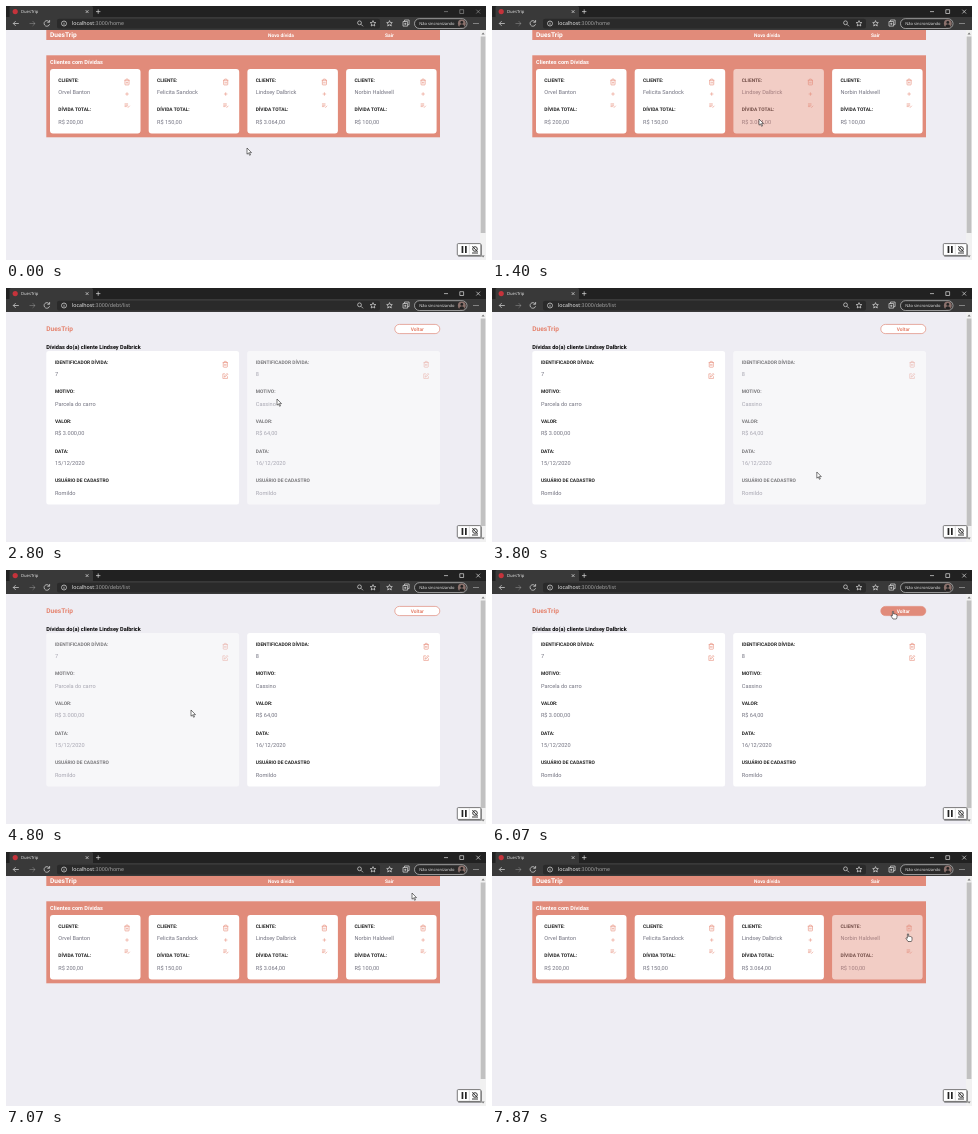
These frames come from a looping animation (480 by 254 pixels, 8000 ms). An HTML page:

```html
<!DOCTYPE html>
<html lang="pt-BR">
<head>
<meta charset="utf-8">
<title>DuesTrip</title>
<style>
  html, body { margin: 0; height: 100%; overflow: hidden; background: #eeedf3; }
  svg { display: block; width: 100vw; height: 100vh; text-rendering: geometricPrecision; }
  text { font: 5.6px Roboto, sans-serif; fill: #737380; }
  .label { font-size: 4.87px; font-weight: 700; fill: #222; }
  .brand { font-size: 6.6px; font-weight: 700; }
  .title { font-weight: 700; fill: #000; }
  .nav { font-size: 4.9px; font-weight: 700; }
  .white { fill: #fff; }
  .accent { fill: #e5836e; }
  .ui text { font-family: "Open Sans", sans-serif; font-size: 5.3px; fill: #aaa; }
  .ui .small { font-size: 4.2px; fill: #e8e8e8; }
  .ui .host { fill: #f4f4f4; }
  .line { fill: none; stroke: #ddd; stroke-width: .7; }
  .icon { fill: none; stroke: #e5836e; stroke-width: 2; stroke-linejoin: round; }
</style>
</head>
<body>
<script>
const LOOP = 8000, OPEN_LIST = 1530, BACK_HOME = 6600;
const SALMON = '#e18b7a';

const icons = {
  trash: 'M3 6h18M19 6v14a2 2 0 0 1-2 2H7a2 2 0 0 1-2-2V6m3 0V4a2 2 0 0 1 2-2h4a2 2 0 0 1 2 2v2M10 11v6M14 11v6',
  edit: 'M11 4H3v17h17v-8M18.5 2.5l3 3L12 15l-4 1 1-4z',
  plus: 'M12 5v14M5 12h14',
  list: 'M3 6h13M3 11h13M3 16h8M13 16l3 3 6-6',
};

const text = (x, y, str, cls = '', extra = '') => `<text x="${x}" y="${y}" class="${cls}" ${extra}>${str}</text>`;
const rect = (x, y, w, h, fill, r = 0, extra = '') =>
  `<rect x="${x}" y="${y}" width="${w}" height="${h}" fill="${fill}" rx="${r}" ${extra}/>`;
const line = (d, extra = '') => `<path class="line" d="${d}" ${extra}/>`;
const icon = (name, cx, cy, size = 7) =>
  `<path class="icon" d="${icons[name]}" transform="translate(${cx - size / 2} ${cy - size / 2}) scale(${size / 24})"/>`;
const star = (x, y) => line(`M${x} ${y - 2.8}l.8 1.9 2 .1-1.5 1.4.5 2-1.8-1.1-1.8 1.1.5-2-1.5-1.4 2-.1z`);

// Label and value pairs stacked inside a card.
const fields = (x, rows) => rows.map(([label, value], i) =>
  text(x, 75.6 + i * 29.7, label, 'label') + text(x, 88 + i * 29.7, value)).join('');

const clientCard = ([name, debt], i) => {
  const x = 44 + i * 98.7;
  return `<g id="client${i}">${rect(x, 63, 90.5, 64.5, '#fff', 3)}
    ${fields(x + 8.3, [['CLIENTE:', name], ['DÍVIDA TOTAL:', debt]])}
    ${icon('trash', x + 77, 76)}${icon('plus', x + 77, 88, 6)}${icon('list', x + 77, 99.5, 6.5)}</g>`;
};

const debtCard = ([id, reason, value, date], i) => {
  const x = 40.3 + i * 200.9;
  return `<g id="debt${i}">${rect(x, 63, 192.8, 153.5, '#fff', 2.5)}
    ${fields(x + 8.6, [['IDENTIFICADOR DÍVIDA:', id], ['MOTIVO:', reason], ['VALOR:', value],
      ['DATA:', date], ['USUÁRIO DE CADASTRO', 'Romildo']])}
    ${icon('trash', x + 179, 76.3)}${icon('edit', x + 179, 88, 6.5)}</g>`;
};

const clients = [['Orvel Banton', 'R$ 200,00'], ['Felicita Sandock', 'R$ 150,00'],
  ['Lindsey Dalbrick', 'R$ 3.064,00'], ['Norbin Haldwell', 'R$ 100,00']];
const debts = [['7', 'Parcela do carro', 'R$ 3.000,00', '15/12/2020'],
  ['8', 'Cassino', 'R$ 64,00', '16/12/2020']];

const home = `<g id="home">
  ${rect(40.3, 24, 393.7, 10, SALMON)}
  ${text(44, 31.2, 'DuesTrip', 'brand white')}
  ${text(262, 31.2, 'Novo dívida', 'nav white')}${text(379, 31.2, 'Sair', 'nav white')}
  ${rect(40.3, 49.3, 393.7, 82, SALMON)}
  ${text(44, 58.2, 'Clientes com Dívidas', 'title white')}
  ${clients.map(clientCard).join('')}</g>`;

const list = `<g id="list">
  ${text(40.3, 43.2, 'DuesTrip', 'brand accent')}
  ${rect(388.8, 36.4, 45, 9.2, '#fff', 4.6, `id="button" stroke="${SALMON}" stroke-width=".7"`)}
  ${text(411.3, 42.8, 'Voltar', 'nav', 'id="back" text-anchor="middle"')}
  ${text(40.3, 61.2, 'Dívidas do(a) cliente Lindsey Dalbrick', 'title')}
  ${debts.map(debtCard).join('')}</g>`;

const browser = `<g class="ui">
  ${rect(0, 0, 480, 24, '#393939')}${rect(0, 0, 480, 11, '#212121')}
  ${rect(3.5, 0, 83.5, 12, '#393939', 1.5)}
  <circle cx="9.2" cy="5.6" r="2.6" fill="#c5333b"/>
  ${text(15, 7.2, 'DuesTrip', 'small')}
  ${line('M79.7 4.2l2.8 2.8m0-2.8l-2.8 2.8M90 5.6h4.4M92.2 3.4v4.4')}
  <g id="controls">${line('M438 5.6h4M453.8 3.7h3.8v3.8h-3.8zM470.3 3.7l3.8 3.8m0-3.8l-3.8 3.8')}</g>
  ${line('M12.8 17.5H7.3l2.4-2.4M7.3 17.5l2.4 2.4M43.3 16a2.8 2.8 0 1 0 .3 2.2M43.6 14v2.3h-2.3')}
  ${line('M23.5 17.5H29l-2.4-2.4M29 17.5l-2.4 2.4', 'opacity=".4"')}
  ${rect(51, 12.7, 323, 9.8, '#2a2a2a', 2)}
  <circle class="line" cx="58" cy="17.5" r="2.5"/>${line('M58 17v1.8M58 15.8v.5')}
  <text x="66" y="19.3"><tspan class="host">localhost</tspan><tspan id="url"></tspan></text>
  <circle class="line" cx="353.5" cy="16.8" r="1.9"/>${line('M355 18.3l2 2')}
  ${star(367, 17.4)}${star(383.5, 17.4)}
  ${line('M397 15.5h4.6v4.6H397zM398.5 15.5V14h4.6v4.6h-1.5M399.3 16.7v2.2m-1.1-1.1h2.2')}
  ${rect(408.5, 12.7, 52.5, 9.8, '#2a2a2a', 4.9, 'stroke="#ddd" stroke-width=".6"')}
  ${text(413.3, 19, 'Não sincronizando', 'small', 'style="font-size:4.05px"')}
  <circle cx="455.8" cy="17.5" r="3.9" fill="#8b716c"/>
  <path d="M453 20.2q2.8-4 5.6 0a3.9 3.9 0 0 1-5.6 0z" fill="#222"/><circle cx="455.8" cy="16.4" r="1.4" fill="#222"/>
  ${[468, 470, 472].map(x => `<circle cx="${x}" cy="17.5" r=".6" fill="#ddd"/>`).join('')}
  ${rect(474, 24, 6, 230, '#f1f1f1')}${rect(474.7, 30.5, 4.7, 196.5, '#c1c1c1', 0, 'id="thumb"')}
  <path d="M475.5 28.5l1.6-2 1.6 2zM475.5 249.5l1.6 2 1.6-2z" fill="#777"/>
  <g id="status">${rect(0, 246, 60, 8, '#393939', 1)}${text(3, 251.7, 'localhost:3000/home', 'small')}</g>
</g>`;

const recorder = `
  ${rect(452, 238.6, 24, 12.4, '#0005', 1)}
  ${rect(451.3, 237.6, 23.6, 11.8, '#fff', 1, 'stroke="#444" stroke-width=".7"')}
  ${rect(455.6, 240, 1.7, 7, '#222')}${rect(459, 240, 1.7, 7, '#222')}
  <path d="M463.3 238.5v10" stroke="#bbb" stroke-width=".5"/>
  <g fill="none" stroke="#222" stroke-width=".9"><circle cx="469" cy="243" r="2.3"/>
  <path d="M466.4 240.2l5.2 5.8M466 247h6"/></g>`;

const cursor = `<g id="cursor" stroke="#111" stroke-width=".55" stroke-linejoin="round" fill="#fff">
  <path id="arrow" d="M0 0V6.2L1.5 4.9 2.6 7.3 3.5 6.9 2.5 4.6H4.5Z"/>
  <path id="hand" d="M-.6.5Q0-.5.6.5V3q1-.5 1.2.2 1-.4 1.2.3 1-.2 1 .6V6Q4 7 3.3 8H0L-2 5q-.3-1.2 1.4-.3z"/></g>`;

document.body.innerHTML =
  `<svg viewBox="0 0 480 254">${home}${list}${browser}${recorder}${cursor}</svg>`;

const el = id => document.getElementById(id);
const ramp = (t, start, length = 150) => Math.min(1, Math.max(0, (t - start) / length));
const pulse = (t, from, to) => ramp(t, from) - ramp(t, to);
const mix = (a, b, k) => a + (b - a) * k;
const rgb = (from, to, k) => `rgb(${from.map((c, i) => mix(c, to[i], k))})`;
const show = (id, on) => { el(id).style.display = on ? '' : 'none'; };
const dim = (id, k) => { el(id).style.opacity = 1 - .43 * k; };

// Pointer stops: time, x, y.
const path = [[530, 241, 142], [930, 262, 121], [1270, 262, 121], [1400, 267, 113], [2730, 267, 113],
  [2800, 271, 111], [3000, 262, 130], [3400, 328, 185], [3730, 328, 185], [4530, 185, 140],
  [4800, 185, 140], [5160, 270, 32], [5530, 366, 50], [5670, 366, 50], [6000, 401, 41],
  [6600, 401, 41], [6900, 406, 41], [7530, 406, 41], [7850, 416, 81.5]];

function pointer(t) {
  const i = path.findIndex(p => p[0] > t);
  if (i === 0) return path[0].slice(1);
  if (i < 0) return path.at(-1).slice(1);
  const [t0, x0, y0] = path[i - 1], [t1, x1, y1] = path[i];
  const k = (t - t0) / (t1 - t0), ease = k * k * (3 - 2 * k);
  return [mix(x0, x1, ease), mix(y0, y1, ease)];
}

function draw(t) {
  const onList = t >= OPEN_LIST && t < BACK_HOME;
  show('home', !onList);
  show('list', onList);
  el('url').textContent = onList ? ':3000/debt/list' : ':3000/home';
  el('thumb').setAttribute('height', onList ? 207.5 : 196.5);
  el('controls').style.opacity = mix(.55, 1, ramp(t, 130, 200));
  show('status', t >= 6270 && t < BACK_HOME);

  dim('client2', pulse(t, 770, BACK_HOME));
  dim('client3', ramp(t, 7700));
  if (t >= BACK_HOME) dim('client2', 0);
  dim('debt1', pulse(t, OPEN_LIST, 4180));
  dim('debt0', pulse(t, 4240, 5030));

  const hover = ramp(t, 5870);
  el('button').setAttribute('fill', rgb([255, 255, 255], [225, 139, 122], hover));
  el('back').style.fill = rgb([229, 131, 110], [255, 255, 255], hover);

  const hand = (onList && t > 5870) || t > 7800;
  show('hand', hand);
  show('arrow', !hand);
  el('cursor').setAttribute('transform', `translate(${pointer(t)})`);
}

(function tick() {
  draw(performance.now() % LOOP);
  requestAnimationFrame(tick);
})();
</script>
</body>
</html>
```
